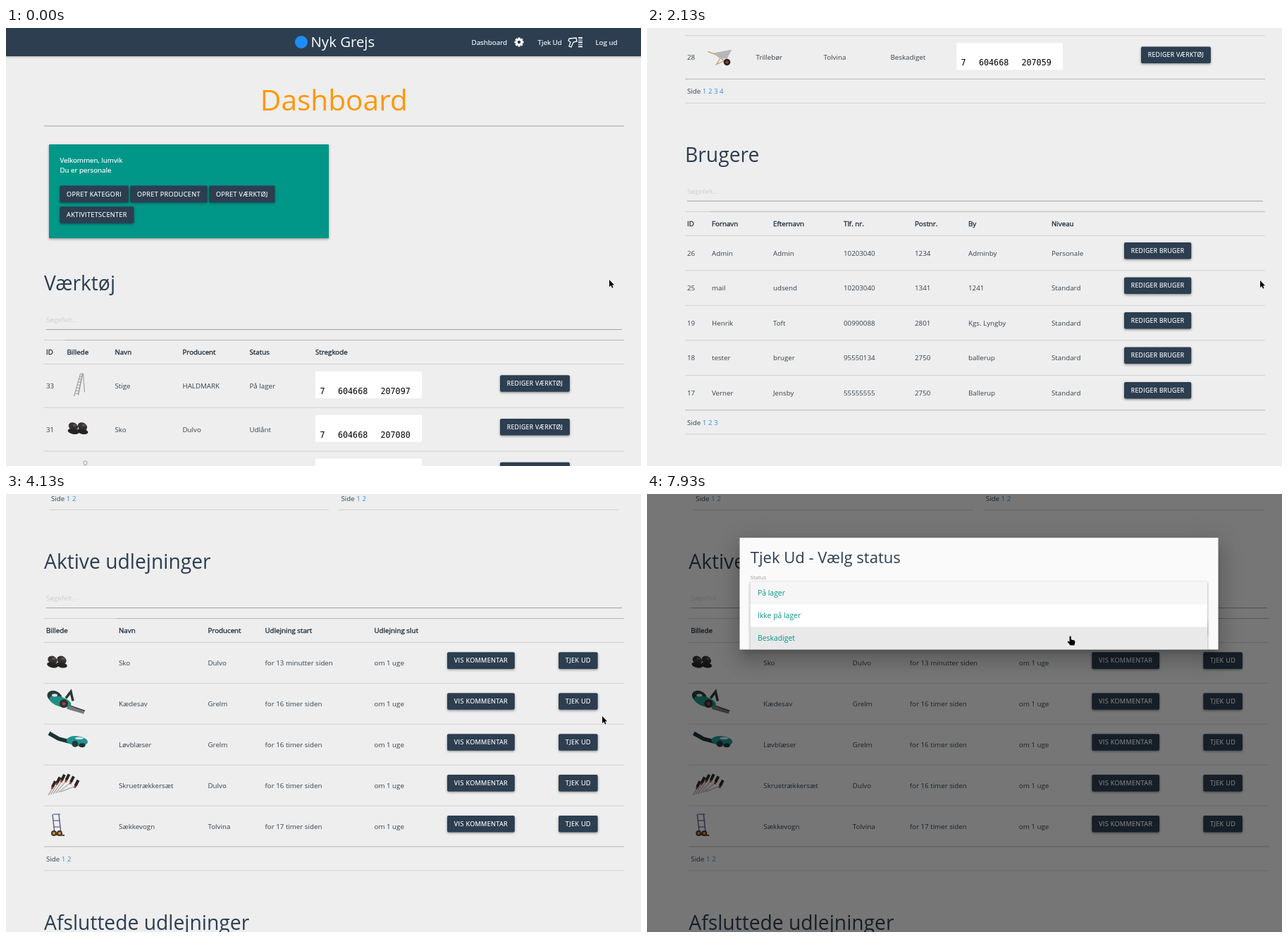
An HTML page with a canvas that plays this animation: 901 px wide and 621 px high, repeating every 8 s.

```html
<!DOCTYPE html>
<html lang="da">
<head>
<meta charset="utf-8">
<title>Dashboard</title>
<style>
  html, body { margin: 0; width: 100%; height: 100%; overflow: hidden; background: #eee; }
  canvas { display: block; width: 901px; height: 621px; }
</style>
</head>
<body>
<canvas id="stage" width="901" height="621"></canvas>
<script>
const W = 901, H = 621, LOOP = 8000, FPS = 15;
const NAVY = '#2c3e50', TEAL = '#009688', INK = '#33424f';
const SANS = '"Open Sans", sans-serif', MONO = '"DejaVu Sans Mono", monospace';
const ctx = document.getElementById('stage').getContext('2d');

const clamp = u => Math.max(0, Math.min(1, u));
const smooth = u => u * u * (3 - 2 * u);
const mix = (a, b, u) => a + (b - a) * u;
const easeOut = (u, power) => 1 - (1 - clamp(u)) ** power;

// ---------- drawing helpers ----------
function text(str, x, cy, { size = 9.75, color = INK, align = 'left', heavy = 0, family = SANS } = {}) {
  ctx.font = `${size}px ${family}`;
  ctx.textAlign = align;
  ctx.fillStyle = ctx.strokeStyle = color;
  const y = cy + size * 0.36;
  ctx.fillText(str, x, y);
  if (heavy) {
    ctx.lineWidth = heavy;
    ctx.strokeText(str, x, y);
  }
}

const heading = (str, x, cy) => text(str, x, cy, { size: 28.25, color: NAVY });

function rule(x0, x1, y, color = 'rgba(0,0,0,.13)') {
  ctx.fillStyle = color;
  ctx.fillRect(x0, y - 0.5, x1 - x0, 1);
}

function box(x, y, w, h, color, r = 0) {
  ctx.fillStyle = color;
  ctx.beginPath();
  ctx.roundRect(x, y, w, h, r);
  ctx.fill();
}

function raised(x, y, w, h, color, r) {
  ctx.save();
  ctx.shadowColor = 'rgba(0,0,0,.4)';
  ctx.shadowBlur = 3.5;
  ctx.shadowOffsetY = 1.3;
  box(x, y, w, h, color, r);
  ctx.restore();
}

// Draws a button as wide as its label needs and returns its right edge.
function button(label, x, cy, size = 9.1) {
  ctx.font = `${size}px ${SANS}`;
  ctx.letterSpacing = '0.33px';
  const w = ctx.measureText(label).width + 19.6;
  raised(x, cy - 11.8, w, 23.6, NAVY, 2);
  text(label, x + w / 2, cy, { size, color: '#fff', align: 'center', heavy: 0.15 });
  ctx.letterSpacing = '0px';
  return x + w;
}

function trace(pts) {
  ctx.beginPath();
  for (let i = 0; i < pts.length; i += 2) ctx.lineTo(pts[i], pts[i + 1]);
}

function poly(color, ...pts) {
  trace(pts);
  ctx.fillStyle = color;
  ctx.fill();
}

function line(color, width, ...pts) {
  trace(pts);
  ctx.strokeStyle = color;
  ctx.lineWidth = width;
  ctx.stroke();
}

function blob(color, x, y, rx, ry = rx, tilt = 0) {
  ctx.fillStyle = color;
  ctx.beginPath();
  ctx.ellipse(x, y, rx, ry, tilt, 0, 7);
  ctx.fill();
}

// ---------- thumbnails, relative to column start and row middle ----------
const thumbs = {
  ladder() {
    line('#a8a8a8', 1.3, 10, 15, 19, -17, 23, -17, 25, 9);
    line('#888', 1.2, 16, 13, 22, -17);
    for (let u = 0.1; u < 1; u += 0.13) {
      const y = mix(14, -17, u);
      line('#999', 1, mix(10, 19, u), y, mix(16, 22, u), y);
    }
  },
  shoes() {
    for (const x of [9, 22]) {
      blob('#363231', x, -4, 7, 5.5, 0.5);
      blob('#262423', x, 3, 8, 3.8, 0.2);
      blob('#5a5450', x + 2, -6, 3, 1.6);
    }
  },
  jack() {
    line('#b0b0b0', 1.4, 25, 8, 25, -10);
    blob('#b8b8b8', 26, -14, 3, 3.5);
    blob('#eee', 26, -14, 1.7, 2.2);
    line('#d49a54', 2.6, 1, 4, 22, 9);
    line('#c08238', 2.4, 8, 11, 24, 6);
    blob('#4a342b', 23, 9, 4, 4);
  },
  truck() {
    for (const x of [9, 18]) line('#5a6078', 1.4, x, -17, x + 3, 10);
    for (const y of [-17, -8, 1]) line('#5260a0', 1.2, 10, y, 20, y);
    line('#4a4038', 2, 14, 12, 26, 13);
    for (const x of [11, 19]) {
      blob('#42362a', x, 10, 4);
      blob('#d0912f', x, 10, 2);
    }
  },
  barrow() {
    line('#c9a66b', 1.4, 0, -8, 13, -3, 24, 6);
    line('#c2a06a', 1.3, 17, 2, 12, 10, 23, 5);
    poly('#b4b6b8', 8, -6, 34, -11, 27, 2, 17, 2);
    blob('#2c2424', 27, 7, 4.8);
    blob('#9a3a33', 27, 7, 2);
  },
  saw() {
    line('#777b78', 5, 30, 5, 54, 12);
    line('#333', 1.2, 32, 2, 55, 10);
    line('#2c3838', 3.5, 28, -8, 35, -17, 38, -4);
    blob('#263c3c', 12, -10, 11, 8, 0.4);
    blob('#1f8f86', 20, -3, 16, 7, 0.3);
    blob('#ddd', 12, -12, 4, 2);
    blob('#303030', 25, 0, 6);
    blob('#a6453b', 25, 0, 2.4);
  },
  blower() {
    line('#1b3336', 5.5, 4, -16, 18, -8, 34, -4);
    blob('#1d958f', 44, -5, 15, 7, 0.1);
    blob('#dde', 47, -9, 6, 1.8);
    blob('#26383a', 41, -1, 4.5);
    blob('#252d2d', 51, 1, 4.5, 3);
  },
  drivers() {
    for (let i = 0; i < 6; i++) {
      const x = 10 + i * 6.5, y = -4 - 10 * Math.sin(i * 0.6);
      line('#a5a09c', 1.2, x, y + 6, 3 + i * 3.5, 14 - i);
      line('#a33a31', 3, x, y + 3, x - 2, y + 9);
      line('#2b2626', 4, x + 3, y - 2, x - 1, y + 6);
    }
  }
};

// ---------- page ----------
const HEAD = 34, GAP = 154;

// Draws a table and returns the top of the next one below it.
function table({ x, w, title, cols, head, rows, pitch, pages, buttons, codes }, top) {
  const right = x + w;
  heading(title, x, top - 80.2);
  text('Søgefelt...', x + 3, top - 29.3, { color: '#cfcfcf' });
  rule(x + 3, right - 3, top - 15, '#a2a2a2');
  rule(x, right, top);
  rule(cols[1] - 3, right, top, 'rgba(0,0,0,.12)');
  head.split('|').forEach((h, i) => text(h, cols[i], top + 17.4, { color: '#22313f', heavy: 0.35 }));
  rule(x, right, top + HEAD);
  rows.forEach((row, r) => {
    const mid = top + HEAD + pitch * (r + 0.5);
    row.split('|').forEach((cell, i) => {
      if (!thumbs[cell]) return text(cell, cols[i], mid + 0.3);
      ctx.save();
      ctx.translate(cols[i], mid);
      thumbs[cell]();
      ctx.restore();
    });
    if (codes) label(r, mid);
    for (const [bx, name, size] of buttons) button(name, bx, mid - 3.3, size);
    rule(x, right, mid + pitch / 2);
  });
  const end = top + HEAD + pitch * rows.length;
  rule(x, right, end);
  text('Side ', x + 3, end + 17.5);
  const numbers = Array.from({ length: pages }, (_, i) => i + 1).join(' ');
  text(numbers, x + 3 + ctx.measureText('Side ').width, end + 17.5, { color: '#2a96d8' });
  rule(x, right, end + HEAD);
  return end + HEAD + GAP;
}

function label(r, mid) {
  box(439, mid - 20.3, 151, 38, '#fff');
  const style = { size: 11.7, color: '#000', family: MONO };
  text('7', 445.5, mid + 7.7, style);
  text('604668', 471, mid + 7.7, style);
  text(`2070${9 - r}${(7 + 3 * r) % 10}`, 531.5, mid + 7.7, style);
}

const wide = { x: 54, w: 823 };
const half = { w: 397, pitch: 49.5, pages: 2, head: 'ID|Navn|Antal værktøj' };

const tools = {
  ...wide, title: 'Værktøj', pitch: 61.7, pages: 4, codes: true,
  cols: [57, 86.5, 154.5, 250.5, 345.5, 439],
  head: 'ID|Billede|Navn|Producent|Status|Stregkode',
  rows: [
    '33|ladder|Stige|HALDMARK|På lager',
    '31|shoes|Sko|Dulvo|Udlånt',
    '30|jack|Palleløfter|VORNT|Udlånt',
    '29|truck|Sækkevogn|Tolvina|Udlånt',
    '28|barrow|Trillebør|Tolvina|Beskadiget'
  ],
  buttons: [[701, 'REDIGER VÆRKTØJ', 8.65]]
};
const users = {
  ...wide, title: 'Brugere', pitch: 49.5, pages: 3,
  cols: [57, 92, 179, 279, 380, 456, 574],
  head: 'ID|Fornavn|Efternavn|Tlf. nr.|Postnr.|By|Niveau',
  rows: [
    '26|Admin|Admin|10203040|1234|Adminby|Personale',
    '25|mail|udsend|10203040|1341|1241|Standard',
    '19|Henrik|Toft|00990088|2801|Kgs. Lyngby|Standard',
    '18|tester|bruger|95550134|2750|ballerup|Standard',
    '17|Verner|Jensby|55555555|2750|Ballerup|Standard'
  ],
  buttons: [[677, 'REDIGER BRUGER', 8.65]]
};
const categories = {
  ...half, x: 61, title: 'Kategorier', cols: [64, 85.5, 233],
  rows: ['8|Bil værktøj|0', '7|Arbejdstøj|4', '6|Universal værktøj|7', '5|Rugbrødsdrevet værktøj|5', '4|Benzindrevet værktøj|1'],
  buttons: [[319, 'REDIGER KATEGORI', 8.65]]
};
const makers = {
  ...half, x: 472.5, title: 'Producenter', cols: [476, 503.5, 582.5],
  rows: ['12|VORNT|1', '11|Tolvina|2', '10|ID|0', '9|Veltorian|3', '7|Kørmeka|0'],
  buttons: [[685, 'REDIGER PRODUCENT', 8.65]]
};
const rentals = {
  ...wide, title: 'Aktive udlejninger', pitch: 57.9, pages: 2,
  cols: [57, 160, 286.5, 367.5, 522.5],
  head: 'Billede|Navn|Producent|Udlejning start|Udlejning slut',
  rows: [
    'shoes|Sko|Dulvo|for 13 minutter siden|om 1 uge',
    'saw|Kædesav|Grelm|for 16 timer siden|om 1 uge',
    'blower|Løvblæser|Grelm|for 16 timer siden|om 1 uge',
    'drivers|Skruetrækkersæt|Dulvo|for 16 timer siden|om 1 uge',
    'truck|Sækkevogn|Tolvina|for 17 timer siden|om 1 uge'
  ],
  buttons: [[626, 'VIS KOMMENTAR'], [784, 'TJEK UD']]
};

function navbar() {
  raised(-5, -5, W + 10, 45, NAVY, 0);
  blob('#1e8dfa', 419, 20, 9);
  text('Nyk Grejs', 432.5, 20, { size: 20.4, color: '#fff' });
  const white = { color: '#fff', size: 9.8, heavy: 0.15 };
  text('Dashboard', 660.5, 20, white);
  text('Tjek Ud', 754.5, 20, white);
  text('Log ud', 836.5, 20, white);
  for (let i = 0; i < 4; i++) {
    const c = Math.cos(i * Math.PI / 4) * 6.5, s = Math.sin(i * Math.PI / 4) * 6.5;
    line('#fff', 3, 728 - c, 20 - s, 728 + c, 20 + s);
  }
  blob('#fff', 728, 20, 5);
  blob(NAVY, 728, 20, 2.2);
  line('#fff', 1.3, 799, 15, 809, 14, 810, 19, 805, 20, 802, 27, 799, 26, 801, 20, 798, 18, 799, 15);
  for (let i = 0; i < 5; i++) line('#fff', i % 2 ? 1 : 1.8, 812, 14 + i * 3.1, 818, 14 + i * 3.1);
}

function welcome() {
  raised(61, 165, 397, 133, TEAL, 1);
  const white = { color: '#fff', heavy: 0.2 };
  text('Velkommen, lumvik', 76.5, 187.5, white);
  text('Du er personale', 76.5, 201.5, white);
  let x = 76.3;
  for (const name of ['KATEGORI', 'PRODUCENT', 'VÆRKTØJ']) x = button(`OPRET ${name}`, x, 235.4) + 2.5;
  button('AKTIVITETSCENTER', 76.3, 265);
}

function page() {
  navbar();
  text('Dashboard', 465.3, 102, { size: 40.6, color: '#ff9800', align: 'center' });
  rule(54, 877, 139, '#a0a0a0');
  welcome();
  let top = table(users, table(tools, 442.5));
  table(makers, top);
  top = table(rentals, table(categories, top));
  heading('Afsluttede udlejninger', 54, top - 80.2);
}

// ---------- motion ----------
const NOTCH = 66.75;
const slowSpins = [605, 1005], quickSpins = [1605, 2068, 2535, 3068, 3605];

function scrollAt(t) {
  const spin = (starts, duration, notches) =>
    starts.reduce((sum, t0) => sum + notches * NOTCH * smooth(clamp((t - t0) / duration)), 0);
  return spin(slowSpins, 380, 3) + spin(quickSpins, 250, 4);
}

// time, x, y
const path = [
  [135, 856, 357], [333, 870, 358], [3900, 870, 358], [4133, 846, 315], [4467, 829, 297],
  [4800, 809, 293], [5000, 814.5, 293], [5470, 814.5, 293], [6067, 639, 210],
  [6600, 598, 146], [7340, 598, 146], [7933, 600.5, 201.5]
];

function cursorAt(t) {
  const next = path.findIndex(p => p[0] > t);
  const b = path.at(next), a = path[Math.max(0, next - 1)] ?? b;
  if (next < 1) return b.slice(1);
  const u = (t - a[0]) / (b[0] - a[0]);
  return [mix(a[1], b[1], u), mix(a[2], b[2], u)];
}

function cursor(t, x, y) {
  ctx.save();
  ctx.translate(x, y);
  ctx.lineJoin = 'round';
  const shape = t > 6430
    ? [-1, 0, 1, 0, 1.5, 5, 6, 6, 7, 8, 6, 13, 0, 13, -4, 8, -3, 7, -1, 8]
    : [0, 0, 0, 10, 2.4, 8, 4, 11.6, 5.6, 11, 4, 7.4, 7, 7.2];
  line('rgba(255,255,255,.8)', 1.2, ...shape, ...shape.slice(0, 2));
  poly('#000', ...shape);
  ctx.restore();
}

function ripple(t) {
  const alpha = 0.32 * (1 - clamp((t - 5450) / 350));
  if (t < 5200 || !alpha) return;
  ctx.save();
  ctx.beginPath();
  ctx.roundRect(784, 2018.2, 56, 23.6, 2);
  ctx.clip();
  blob(`rgba(255,160,80,${alpha})`, 810, 2030, (t - 5200) * 0.4);
  ctx.restore();
}

// ---------- modal ----------
const MODAL = { x: 131.5, y: 62, w: 679, h: 158.6 };

function modalShadow() {
  const { x, y, w, h } = MODAL, far = 3000;
  ctx.save();
  ctx.beginPath();
  ctx.rect(-200, -200, W + 400, H + 400);
  ctx.rect(x, y, w, h);
  ctx.clip('evenodd');
  ctx.shadowOffsetX = far;
  for (const [dy, blur, spread, a] of [[16, 25, 2, 0.14], [6, 30, 5, 0.12], [7, 10, -5, 0.2]]) {
    ctx.shadowColor = `rgba(0,0,0,${a})`;
    ctx.shadowBlur = blur;
    ctx.shadowOffsetY = dy;
    box(x - far - spread, y - spread, w + 2 * spread, h + 2 * spread, '#000');
  }
  ctx.restore();
}

function dropdown(t, pointerY) {
  if (t < 6765) return;
  const p = easeOut((t - 6765) / 150, 5);
  const x = 146.5, y = 124.2, w = 648.5, rowH = 32.2;
  const hover = Math.floor((pointerY - y) / rowH);
  ctx.save();
  ctx.beginPath();
  ctx.rect(MODAL.x, MODAL.y, MODAL.w, MODAL.h);
  ctx.clip();
  ctx.globalAlpha *= p;
  ctx.translate(x, y);
  ctx.scale(mix(0.3, 1, p), mix(0.3, 1, p));
  raised(0, 0, w, rowH * 3, '#fff', 1);
  ['På lager', 'Ikke på lager', 'Beskadiget'].forEach((name, i) => {
    const shade = i === 0 ? 0.035 : i === hover ? 0.085 : 0;
    box(0, i * rowH, w, rowH, `rgba(0,0,0,${shade})`);
    text(name, 10.5, (i + 0.5) * rowH, { size: 10.4, color: TEAL });
  });
  ctx.restore();
}

function modal(t, pointerY) {
  const u = (t - 5275) / 250, p = easeOut(u, 3), scale = mix(0.8, 1, p);
  ctx.fillStyle = `rgba(0,0,0,${0.5 * easeOut(u, 2)})`;
  ctx.fillRect(0, 0, W, H);
  const cx = MODAL.x + MODAL.w / 2, cy = MODAL.y + MODAL.h / 2;
  ctx.save();
  ctx.globalAlpha = p;
  ctx.translate(cx, cy - 0.06 * H * (1 - p));
  ctx.scale(scale, scale);
  ctx.translate(-cx, -cy);
  modalShadow();
  box(MODAL.x, MODAL.y, MODAL.w, MODAL.h, '#fafafa');
  text('Tjek Ud - Vælg status', 146.8, 89.6, { size: 22.05, color: NAVY });
  text('Status', 146.8, 118, { size: 7.75, color: '#9e9e9e' });
  text('På lager', 146.8, 139, { color: '#222' });
  poly('#222', 783.8, 137.4, 790.4, 137.4, 787.1, 140.8);
  rule(146.5, 795, 153.5, '#9e9e9e');
  button('TJEK UD', 739, 190);
  dropdown(t, pointerY);
  ctx.restore();
}

function draw(now) {
  const t = Math.floor((now % LOOP + 5) * FPS / 1000) * 1000 / FPS % LOOP;
  const open = t > 5260, [x, y] = cursorAt(t);
  ctx.fillStyle = '#eee';
  ctx.fillRect(0, 0, W, H);
  ctx.save();
  ctx.translate(open ? 5.3 : 0, -scrollAt(t));
  page();
  ripple(t);
  ctx.restore();
  if (open) modal(t, y);
  cursor(t, x, y);
}

const begin = performance.now();
function loop() {
  draw(performance.now() - begin);
  requestAnimationFrame(loop);
}
loop();
</script>
</body>
</html>
```
